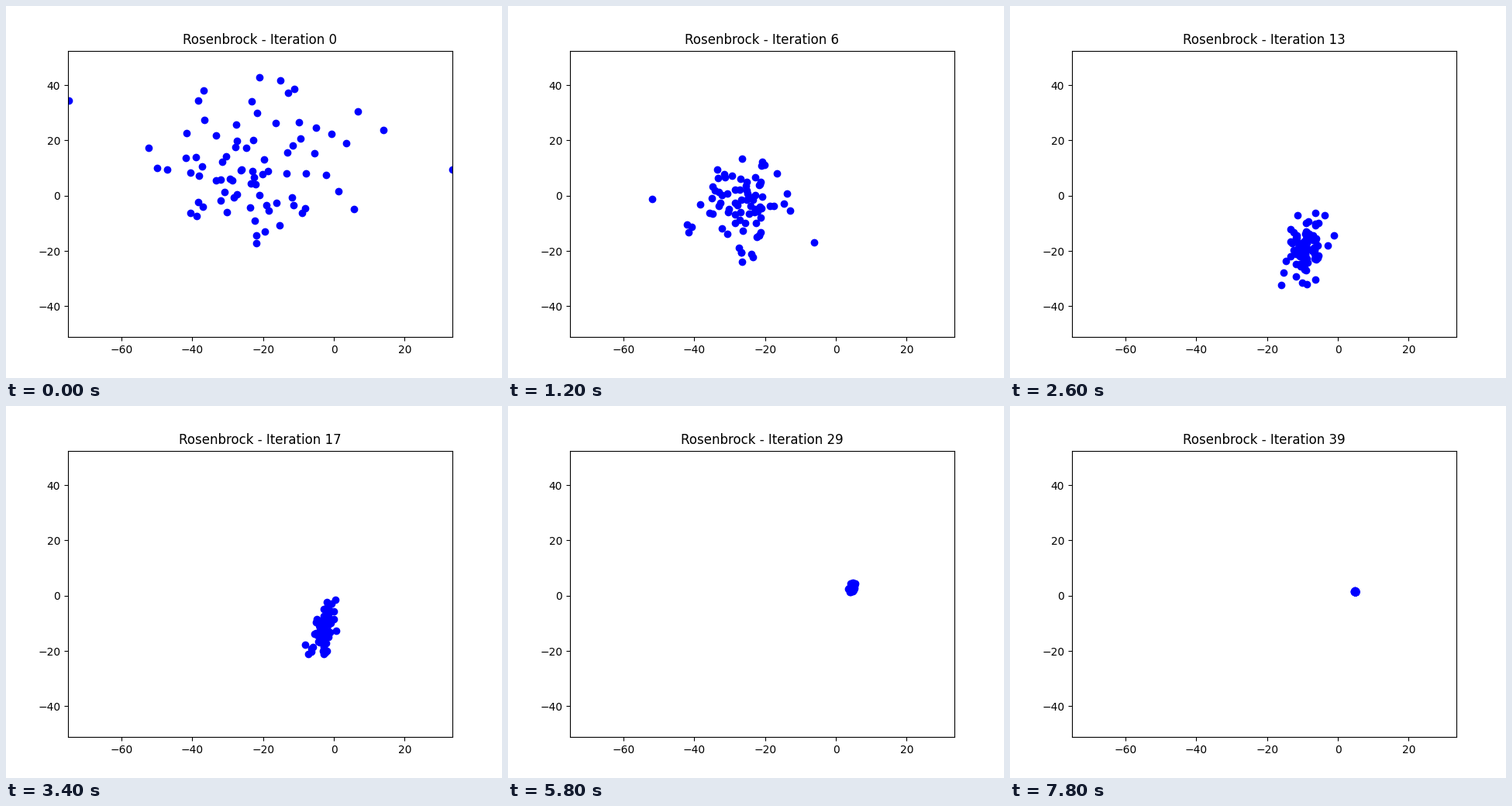
Write a matplotlib script that moves like this. It is 640 px wide and 480 px high and loops after 8 s.

```python
import numpy as np
import matplotlib.pyplot as plt
from matplotlib.animation import FuncAnimation

COUNT = 80
STEPS = 40
STEP_MS = 200

# Way points of the swarm's centre
TIMES = np.array([0, 2, 6, 13, 21, 29, 39])
CENTRE_X = np.array([-22.5, -44.5, -27, -8.8, 0.4, 4.5, 4.85])
CENTRE_Y = np.array([13.5, 29, -4.5, -19.5, -2.6, 3, 1.55])

rng = np.random.default_rng(5)
start, later = rng.normal(size=(2, COUNT, 2))
# Two stragglers begin on the left and right edges of the plot
start[:2] = [(-3.5, 1.4), (3.73, -0.3)]


def smooth_path(values, i):
    """Cubic Hermite curve through the way points."""
    slopes = np.gradient(values, TIMES)
    k = min(np.searchsorted(TIMES, i, side="right") - 1, len(TIMES) - 2)
    h = TIMES[k + 1] - TIMES[k]
    u = (i - TIMES[k]) / h
    return ((1 + 2 * u) * (1 - u) ** 2 * values[k]
            + u * (1 - u) ** 2 * h * slopes[k]
            + u * u * (3 - 2 * u) * values[k + 1]
            + u * u * (u - 1) * h * slopes[k + 1])


def swarm(i):
    """Shrinking cloud that is drawn out along the valley midway."""
    stretch = np.exp(-((i - 21) / 10) ** 2)
    corr = 0.7 * stretch
    width = 15 * np.exp(-0.13 * i)
    height = width * (1 + 2 * stretch)
    turn = 0.6 * i
    zx, zy = (np.cos(turn) * start + np.sin(turn) * later).T
    x = smooth_path(CENTRE_X, i) + width * zx
    y = (smooth_path(CENTRE_Y, i)
         + height * (corr * zx + np.sqrt(1 - corr ** 2) * zy))
    return np.column_stack([x, y])


fig, ax = plt.subplots(figsize=(6.4, 4.8), dpi=100)
ax.set_xlim(-75.14, 33.5)
ax.set_ylim(-51.15, 52.5)
dots = ax.scatter(*swarm(0).T, color="blue")
title = ax.set_title("Rosenbrock - Iteration 0")


def update(i):
    dots.set_offsets(swarm(i))
    title.set_text(f"Rosenbrock - Iteration {i}")
    return dots, title


anim = FuncAnimation(fig, update, frames=STEPS, interval=STEP_MS,
                     repeat=True, repeat_delay=0)
plt.show()
```
